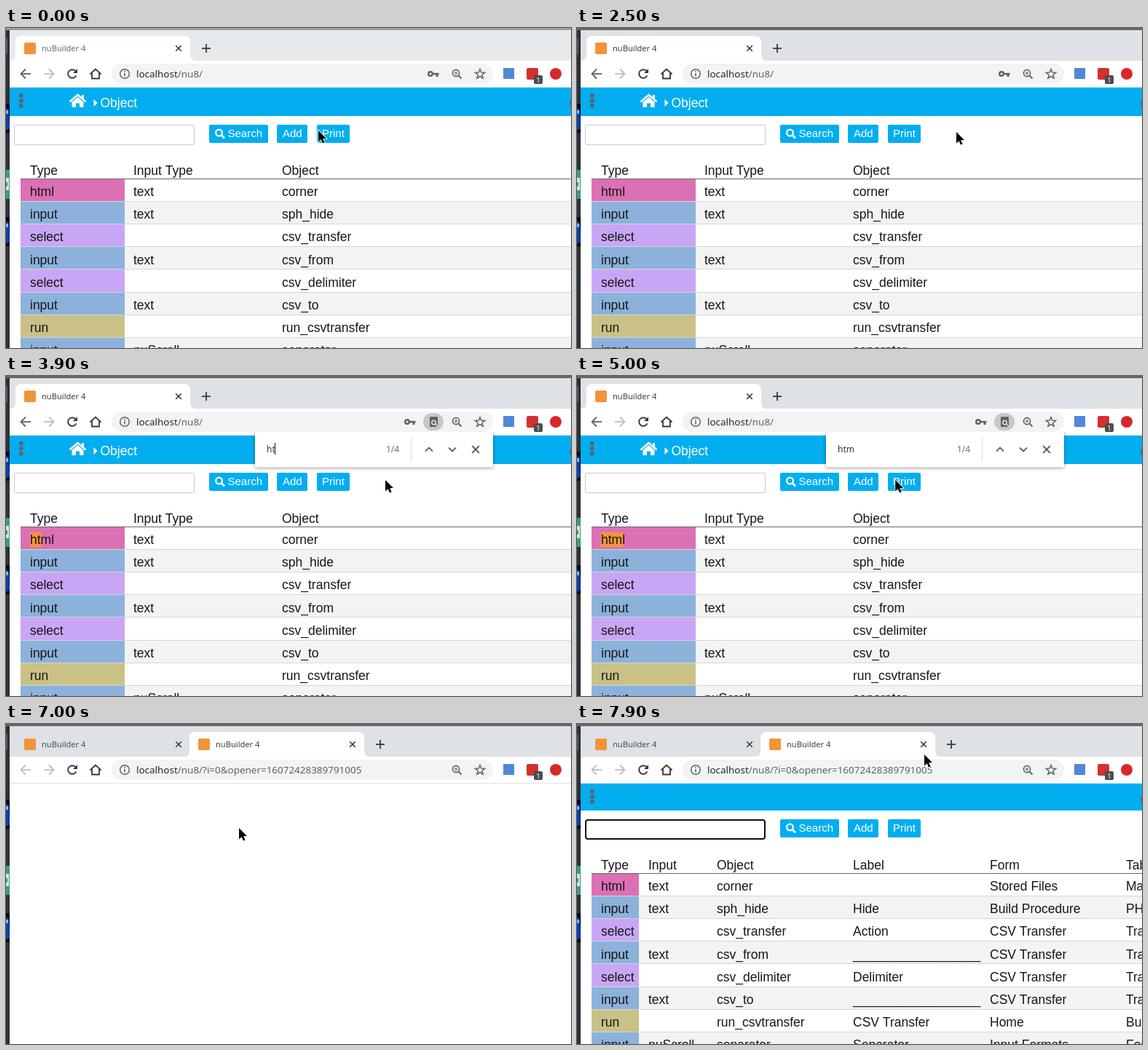
Write an HTML page with a canvas that moves like this. It is 776x440 px and loops after 8000 ms.

```html
<!DOCTYPE html>
<html lang="en">
<head>
<meta charset="utf-8">
<title>Find in page</title>
<style>
html, body { margin: 0; width: 100%; height: 100%; overflow: hidden; background: #fff; }
canvas { display: block; width: 776px; height: 440px; }
</style>
</head>
<body>
<canvas id="stage" width="776" height="440"></canvas>
<script>
const ctx = document.getElementById('stage').getContext('2d');
const LOOP = 8000, STEP = 100;
const UI = '"Noto Sans", "Open Sans", sans-serif';
const PAGE = '"Liberation Sans", Arial, sans-serif';
const BLUE = '#02aeef', GREY = '#5f6368', PALE = '#bcbfc3', INK = '#36393d';
const TYPE_COLORS = { html: '#dc70b4', input: '#8cb2db', select: '#c8a6f5', run: '#c9c186' };
const BLANK_LABEL = '_'.repeat(18);

// type, input, object, label, form, tab
const ROWS = [
  ['html', 'text', 'corner', '', 'Stored Files', 'Main'],
  ['input', 'text', 'sph_hide', 'Hide', 'Build Procedure', 'PHP'],
  ['select', '', 'csv_transfer', 'Action', 'CSV Transfer', 'Transfer'],
  ['input', 'text', 'csv_from', BLANK_LABEL, 'CSV Transfer', 'Transfer'],
  ['select', '', 'csv_delimiter', 'Delimiter', 'CSV Transfer', 'Transfer'],
  ['input', 'text', 'csv_to', BLANK_LABEL, 'CSV Transfer', 'Transfer'],
  ['run', '', 'run_csvtransfer', 'CSV Transfer', 'Home', 'Build'],
  ['input', 'nuScroll', 'separator', 'Separator', 'Input Formats', 'Format']
];
const MAIN_VIEW = { dy: 0, typeEnd: 163, cols: [33, 175, 379], heads: ['Type', 'Input Type', 'Object'] };
const POPUP_VIEW = {
  dy: -2, typeEnd: 85, cols: [33, 98, 192, 379, 567, 754],
  heads: ['Type', 'Input', 'Object', 'Label', 'Form', 'Tab']
};

// start, end, from, to
const MOVES = [
  [700, 1100, [429, 141], [521, 143]],
  [4600, 5500, [521, 143], [320, 143]],
  [7200, 7900, [320, 143], [477, 42]]
];

function box(x, y, w, h, color) {
  ctx.fillStyle = color;
  ctx.fillRect(x, y, w, h);
}

function roundBox(x, y, w, h, r, color) {
  ctx.fillStyle = color;
  ctx.beginPath();
  ctx.roundRect(x, y, w, h, r);
  ctx.fill();
}

function disc(x, y, r, color) {
  ctx.fillStyle = color;
  ctx.beginPath();
  ctx.arc(x, y, r, 0, Math.PI * 2);
  ctx.fill();
}

function arc(x, y, r, color, width, from = 0, to = Math.PI * 2) {
  ctx.strokeStyle = color;
  ctx.lineWidth = width;
  ctx.beginPath();
  ctx.arc(x, y, r, from, to);
  ctx.stroke();
}

function trace(points) {
  ctx.beginPath();
  points.forEach(([x, y]) => ctx.lineTo(x, y));
}

function line(points, color, width, closed = false) {
  ctx.strokeStyle = color;
  ctx.lineWidth = width;
  trace(points);
  if (closed) ctx.closePath();
  ctx.stroke();
}

function poly(points, color) {
  ctx.fillStyle = color;
  trace(points);
  ctx.fill();
}

function text(str, x, y, size, color, family = PAGE) {
  ctx.font = `${size}px ${family}`;
  ctx.fillStyle = color;
  ctx.fillText(str, x, y);
}

function textWidth(str, size, family) {
  ctx.font = `${size}px ${family}`;
  return ctx.measureText(str).width;
}

function cross(x, y, r, color, width) {
  line([[x - r, y - r], [x + r, y + r]], color, width);
  line([[x - r, y + r], [x + r, y - r]], color, width);
}

function plus(x, y, r, color, width) {
  line([[x - r, y], [x + r, y]], color, width);
  line([[x, y - r], [x, y + r]], color, width);
}

function drawDesktop() {
  box(0, 0, 5, 440, '#303038');
  box(0, 14, 2, 22, '#56565d');
  for (const y of [104, 260]) {
    box(0, y, 5, 40, '#05060c');
    poly([[0, y + 5], [4, y + 9], [5, y + 34], [0, y + 37]], '#0b3fa8');
    box(0, y + 9, 3, 5, '#7fb4ee');
  }
  box(0, 195, 5, 40, '#3c9c7c');
  box(0, 206, 4, 17, '#d9e6e2');
  box(0, 212, 2, 6, '#3c9c7c');
}

function tabShape(x, right) {
  const top = 11, bottom = 45, r = 8;
  ctx.fillStyle = '#fff';
  ctx.beginPath();
  ctx.moveTo(x - r, bottom);
  ctx.quadraticCurveTo(x, bottom, x, bottom - r);
  ctx.lineTo(x, top + r);
  ctx.quadraticCurveTo(x, top, x + r, top);
  ctx.lineTo(right - r, top);
  ctx.quadraticCurveTo(right, top, right, top + r);
  ctx.lineTo(right, bottom - r);
  ctx.quadraticCurveTo(right, bottom, right + r, bottom);
  ctx.fill();
}

function tabContent(x, color) {
  roundBox(x + 12, 20, 16, 16, 2, '#f29339');
  text('nuBuilder 4', x + 36, 32, 11.1, color, UI);
  cross(x + 224, 28, 3.8, INK, 1.6);
}

function drawTabs(active, popupWidth) {
  box(5, 0, 771, 45, active ? '#dee1e6' : '#e7eaed');
  box(0, 0, 776, 3, active ? '#67666d' : '#a09fa5');
  const titleColor = active ? '#3c4043' : '#6a6d71';
  if (popupWidth) {
    tabContent(13, '#4a4d51');
    tabShape(252, 252 + popupWidth);
    ctx.save();
    ctx.beginPath();
    ctx.rect(252, 0, popupWidth, 45);
    ctx.clip();
    tabContent(252, titleColor);
    ctx.restore();
  } else {
    tabShape(13, 253);
    tabContent(13, titleColor);
  }
  plus(popupWidth ? 274 + popupWidth : 275, 28, 6, INK, 1.8);
}

function arrow(x, dir, color) {
  line([[x - 7 * dir, 63], [x + 6 * dir, 63]], color, 1.8);
  line([[x, 56.5], [x + 6.5 * dir, 63], [x, 69.5]], color, 1.8);
}

function drawNavigation(canGoBack) {
  arrow(27, -1, canGoBack ? GREY : PALE);
  arrow(59, 1, PALE);
  arc(91, 63, 5.8, INK, 1.9, 0.4, 5.5);
  poly([[92, 62], [98, 62], [98, 56]], INK);
  line([[115.5, 63.5], [123, 56.5], [130.5, 63.5]], INK, 1.8);
  line([[118, 62], [118, 69.5], [128, 69.5], [128, 62]], INK, 1.8);
}

function drawKey(x) {
  arc(x - 4, 63, 2.8, GREY, 2.4);
  box(x, 61.8, 7.5, 2.5, GREY);
  box(x + 3.5, 63, 3, 4, GREY);
}

function drawPageSearchIcon() {
  roundBox(573, 51, 28, 24, 12, '#c6c8ca');
  roundBox(582, 56, 11, 14, 1, GREY);
  arc(587.5, 64, 2.7, '#e4e6e8', 1.5);
  line([[589.5, 66], [593, 69.5]], '#e4e6e8', 1.5);
}

function drawStar(cx, cy) {
  const points = Array.from({ length: 10 }, (_, i) => {
    const r = i % 2 ? 3 : 7, a = i * Math.PI / 5 - Math.PI / 2;
    return [cx + r * Math.cos(a), cy + r * Math.sin(a)];
  });
  line(points, GREY, 1.5, true);
}

function drawToolbar(popup, finding) {
  box(5, 45, 771, 37, '#fff');
  box(5, 81, 771, 1, '#dfe1e3');
  drawNavigation(!popup);
  roundBox(145, 49, 524, 28, 14, '#f1f3f4');

  arc(163, 63, 6.3, GREY, 1.5);
  box(162.2, 62, 1.6, 4.5, GREY);
  box(162.2, 59, 1.6, 1.7, GREY);
  const size = 13.45;
  text('localhost', 179, 68, size, '#25282c', UI);
  const path = popup ? '/nu8/?i=0&opener=16072428389791005' : '/nu8/';
  text(path, 179 + textWidth('localhost', size, UI), 68, size, GREY, UI);

  if (!popup) drawKey(finding ? 555 : 587);
  if (finding) drawPageSearchIcon();
  arc(618, 62, 4.6, GREY, 1.6);
  line([[621.5, 65.5], [625.5, 69.5]], GREY, 1.9);
  plus(618, 62, 2.4, GREY, 1.1);
  drawStar(651, 63.5);

  box(683, 55, 15, 15, '#5088d8');
  roundBox(715, 55, 16, 16, 2, '#d3302f');
  roundBox(725, 65, 12, 12, 2, '#4b4d50');
  text('1', 728.2, 74.6, 9.5, '#fff', UI);
  disc(755, 63, 8, '#d7282c');
}

function drawHeader(view) {
  box(5, 82, 771, 39 + view.dy, BLUE);
  for (let i = 0; i < 3; i++) roundBox(18, 90 + i * 7, 5.5, 5.5, 1.5, '#5b6270');
  box(774, 100, 2, 7, '#526b84');
  if (view === POPUP_VIEW) return;
  line([[87.5, 101.5], [98.5, 92], [109.5, 101.5]], '#fff', 2.6);
  box(104, 92, 3, 6, '#fff');
  poly([[90.5, 102], [98.5, 95], [106.5, 102], [106.5, 109], [101, 109],
    [101, 103.5], [96, 103.5], [96, 109], [90.5, 109]], '#fff');
  poly([[120.5, 98], [125.5, 103], [120.5, 108]], '#fff');
  text('Object', 129.5, 109, 17.5, '#fff');
}

function drawControls(dy, focused) {
  ctx.strokeStyle = focused ? '#101010' : '#c9c9c9';
  ctx.lineWidth = focused ? 2 : 1;
  const inset = ctx.lineWidth / 2;
  ctx.beginPath();
  ctx.roundRect(11 + inset, 133 + dy + inset, 248 - 2 * inset, 28 - 2 * inset, focused ? 3 : 1);
  ctx.stroke();

  for (const [x, w, label, textX] of [
    [279, 81, 'Search', 304.5], [372, 42, 'Add', 380], [427, 45, 'Print', 434]
  ]) {
    roundBox(x, 133 + dy, w, 25, 2, BLUE);
    text(label, textX, 150 + dy, 15, '#fff');
  }
  arc(292.5, 144 + dy, 4.4, '#fff', 2.2);
  line([[295.8, 147.3 + dy], [300, 151.5 + dy]], '#fff', 2.8);
}

function drawTable({ dy, typeEnd, cols, heads }, match) {
  heads.forEach((head, i) => text(head, cols[i], 202 + dy, 17.5, '#161616'));
  ROWS.forEach((row, i) => {
    const top = Math.round(207.5 + dy + i * 31.2), bottom = Math.round(207.5 + dy + (i + 1) * 31.2);
    box(20, top, 756, bottom - top, i % 2 ? '#f3f3f3' : '#fff');
    box(20, top, typeEnd - 20, bottom - top, TYPE_COLORS[row[0]]);
    box(20, bottom - 1, 756, 1, '#d4d6d8');
    if (match && row[0].startsWith(match)) {
      box(cols[0], top + 7, textWidth(match, 17.5, PAGE) + 1, 20, '#f89539');
    }
    const base = Math.round(231 + dy + i * 31.2);
    cols.forEach((x, c) => text(row[c], x, base, 17.5, '#161616'));
  });
  box(20, 207 + dy, 756, 1, '#686868');
}

function drawFindBar(query, caretOn, reveal) {
  ctx.save();
  ctx.beginPath();
  ctx.rect(330, 77, 352, 60);
  ctx.clip();
  ctx.translate(0, (reveal - 1) * 49);
  ctx.shadowColor = 'rgba(0,0,0,.4)';
  ctx.shadowBlur = 5;
  ctx.shadowOffsetY = 1;
  roundBox(342, 75, 327, 50.5, 2, '#fff');
  ctx.shadowColor = 'transparent';

  text(query, 358, 105, 12, '#33363a', UI);
  if (caretOn) box(358 + Math.floor(textWidth(query, 12, UI)), 92, 1, 16, '#111');
  const found = query.length > 1;
  if (found) text('1/4', 522, 105, 12, '#6c7074', UI);
  box(556, 84, 1, 33, '#dadce0');
  const chevron = found ? GREY : '#c3c6ca';
  line([[576, 103.5], [581, 98.5], [586, 103.5]], chevron, 1.8);
  line([[608, 98.5], [613, 103.5], [618, 98.5]], chevron, 1.8);
  cross(645, 101, 4.8, '#54585c', 1.9);
  ctx.restore();
}

function cursorAt(t) {
  let pos = MOVES[0][2];
  for (const [start, end, from, to] of MOVES) {
    if (t < start) break;
    const p = Math.min(1, (t - start) / (end - start));
    const ease = p * p * (3 - 2 * p);
    pos = from.map((v, i) => v + (to[i] - v) * ease);
  }
  return pos;
}

function drawCursor([x, y]) {
  const shape = [[0, 0], [0, 15.5], [3.6, 12.2], [6, 17.6], [8.6, 16.4], [6.2, 11.2], [11, 11]]
    .map(([dx, dy]) => [x + dx, y + dy]);
  line(shape, '#fff', 1.6, true);
  poly(shape, '#050505');
}

function queryAt(t) {
  const length = [3700, 3900, 4100].filter(time => t >= time).length;
  return 'html'.slice(0, length);
}

function caretAt(t) {
  return [3000, 3400, 3700, 4500, 5100, 5600, 6100].filter(time => t >= time).length % 2 === 1;
}

function render(time) {
  const t = Math.floor(time / STEP) * STEP;
  const popup = t >= 6400;
  const finding = t >= 2900 && !popup;
  const view = popup ? POPUP_VIEW : MAIN_VIEW;
  const query = queryAt(t);

  box(0, 0, 776, 440, '#fff');
  drawDesktop();
  drawTabs(t >= 2500, popup ? Math.min(240, 80 + (t - 6400) * 0.8) : 0);
  drawToolbar(popup, finding);
  if (!popup || t >= 7100) drawHeader(view);
  if (!popup || t >= 7200) {
    drawControls(view.dy, popup);
    drawTable(view, finding && query.length > 1 ? query : '');
  }
  if (finding) drawFindBar(query, caretAt(t), t < 3000 ? 0.5 : 1);
  drawCursor(cursorAt(t));
}

function tick() {
  render(performance.now() % LOOP);
  requestAnimationFrame(tick);
}
tick();
</script>
</body>
</html>
```
